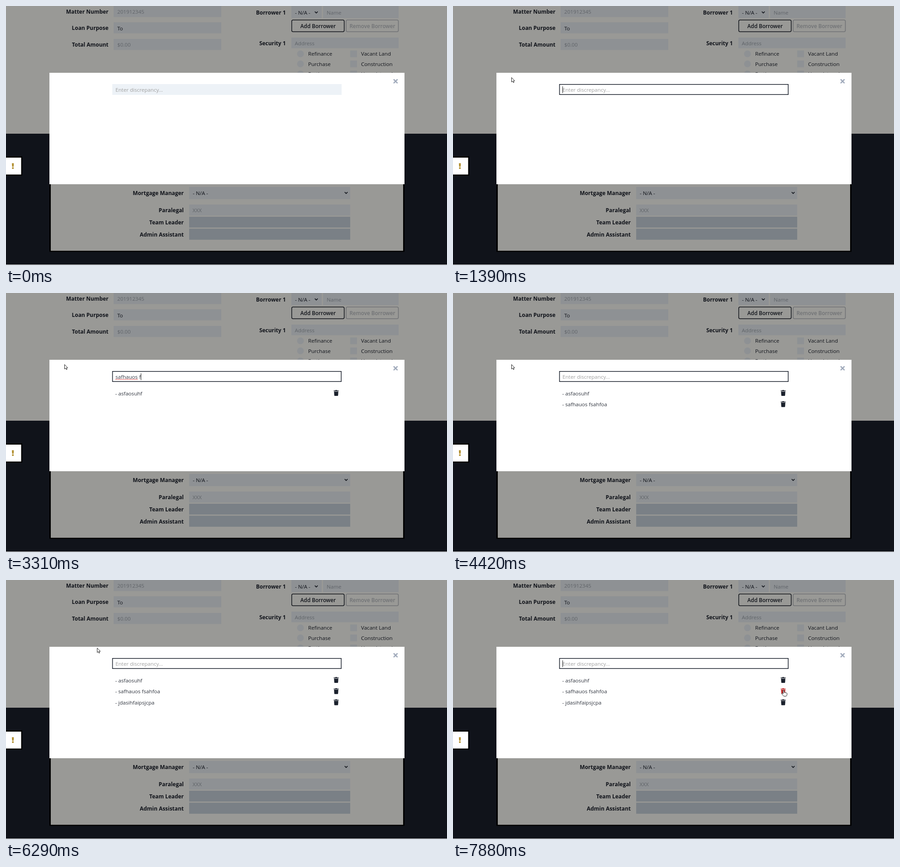
Recreate the animation shown at these times as an HTML page with a canvas. Size 975 by 574 pixels, loop 8 s.

```html
<!DOCTYPE html>
<html lang="en">
<head>
<meta charset="utf-8">
<title>Discrepancy form</title>
<style>
  html, body { margin: 0; width: 100%; height: 100%; overflow: hidden; }
  canvas { display: block; }
</style>
</head>
<body>
<canvas id="stage" width="975" height="574"></canvas>
<script>
const ctx = document.getElementById('stage').getContext('2d');
const LOOP = 8000, FOCUS = 1060, BLINK = 510;
const REGULAR = '11.6px "Open Sans", sans-serif';
const BOLD = 'bold 11.95px "Open Sans", sans-serif';
const SEMI = '600 11.7px "Open Sans", sans-serif';
const INK = '#1a202c', DIM_INK = '#10131a', PAGE = '#999996', DIM_FIELD = '#8e9194',
      DIM_FILLED = '#7a8086', DIM_HINT = '#606469', HINT = '#a0a0a0';

// keys: [time, number of characters typed]
const entries = [
  { text: 'asfaosuhf', submit: 2340,
    keys: [[1480, 1], [1600, 2], [1710, 3], [1860, 6], [1940, 8], [2120, 9]] },
  { text: 'safhauos fsahfoa', submit: 3910,
    keys: [[2880, 1], [3030, 3], [3120, 6], [3220, 9], [3310, 10], [3450, 11], [3510, 12], [3570, 13], [3620, 15], [3680, 16]] },
  { text: 'jdasihfaipsjcpa', submit: 5500,
    keys: [[4470, 2], [4640, 4], [4720, 5], [4800, 7], [4940, 8], [5010, 9], [5090, 11], [5160, 12], [5230, 14], [5310, 15]] },
];

// pointer stops: [time, x, y]
const stops = [
  [30, 855, 524], [400, 500, 174], [670, 500, 174], [900, 493, 184], [1090, 493, 184],
  [1240, 300, 158], [1330, 160, 152], [1390, 129, 158], [6130, 129, 158], [6400, 250, 145],
  [6650, 480, 178], [6900, 677, 232], [6950, 690, 231], [7130, 724, 231], [7370, 729, 228],
  [7520, 729, 228], [7880, 731, 244],
];

function rect(x, y, w, h, color) {
  ctx.fillStyle = color;
  ctx.fillRect(x, y, w, h);
}

function outline(x, y, w, h, radius, color) {
  ctx.beginPath();
  ctx.roundRect(x, y, w, h, radius);
  ctx.lineWidth = 1.5;
  ctx.strokeStyle = color;
  ctx.stroke();
}

function text(str, x, y, color = DIM_INK, font = REGULAR, align = 'left') {
  ctx.font = font;
  ctx.textAlign = align;
  ctx.fillStyle = color;
  ctx.fillText(str, x, y);
}

const label = (str, x, y) => text(str, x, y, DIM_INK, BOLD, 'right');

function chevron(x, y) {
  ctx.strokeStyle = DIM_INK;
  ctx.lineWidth = 1.6;
  ctx.stroke(new Path2D(`M${x - 3.2} ${y - 1.6}l3.2 3.2l3.2 -3.2`));
}

function drawPage() {
  rect(0, 0, 975, 283, PAGE);
  rect(0, 283, 975, 291, DIM_INK);
  rect(0, 573, 975, 1, '#d9dadb');

  [['Matter Number', '201912345', DIM_HINT], ['Loan Purpose', 'To', DIM_INK], ['Total Amount', '$0.00', DIM_HINT]]
    .forEach(([name, value, color], i) => {
      const y = i * 36.3;
      label(name, 226.5, y + 17);
      rect(238, Math.round(y), 238, 24.5, DIM_FIELD);
      text(value, 246, y + 17.3, color);
    });

  label('Borrower 1', 618.5, 18.5);
  rect(631, 0, 67, 27, DIM_FIELD);
  text('- N/A -', 639, 18.5);
  chevron(686, 14);
  rect(701, 0, 167, 27, DIM_FIELD);
  text('Name', 709, 18.5, DIM_HINT);
  outline(631.7, 31, 116, 26, 3, DIM_INK);
  text('Add Borrower', 690, 48.5, DIM_INK, SEMI, 'center');
  outline(752, 31, 115.5, 26, 3, '#707275');
  text('Remove Borrower', 810, 48.5, '#707275', SEMI, 'center');
  label('Security 1', 618.5, 86.5);
  rect(631, 70, 237, 23.5, DIM_FIELD);
  text('Address', 638.5, 86.5, DIM_HINT);

  [['Refinance', 'Vacant Land'], ['Purchase', 'Construction'], ['Further', 'Unregistered']]
    .forEach(([type, land], i) => {
      const y = 106 + i * 22.3;
      ctx.fillStyle = DIM_FIELD;
      ctx.beginPath();
      ctx.arc(651, y, 7.5, 0, 7);
      ctx.fill();
      rect(761, y - 7.5, 15, 15, DIM_FIELD);
      text(type, 668, y + 4.3);
      text(land, 785, y + 4.3);
    });

  rect(96, 390, 785, 155, '#000');
  rect(99, 390, 779, 152.5, PAGE);
  label('Mortgage Manager', 393, 419);
  rect(405, 401, 356, 27, DIM_FIELD);
  text('- N/A -', 413, 419);
  chevron(752, 414);
  label('Paralegal', 393, 457);
  rect(405, 440, 356, 24.5, DIM_FIELD);
  text('XXX', 412.5, 457.3, DIM_HINT);
  label('Team Leader', 393, 484);
  rect(405, 467, 356, 24, DIM_FILLED);
  label('Admin Assistant', 393, 511);
  rect(405, 493.5, 356, 24.5, DIM_FILLED);

  rect(0, 333, 36, 43, '#000');
  rect(0, 336, 33.5, 37.5, '#fff');
  ctx.fillStyle = '#b08d2c';
  ctx.fill(new Path2D('M13 348.5h4.4l-.6 7.8h-3.2zM15.2 357.2a2 2 0 1 1 -.01 0z'));
}

function trash(x, y, color) {
  ctx.fillStyle = color;
  ctx.fill(new Path2D(`M${x} ${y + 1}h3l.8 -1h3.4l.8 1h3v1.6h-11zM${x + .7} ${y + 3.4}h9.6l-.6 8.6q-.1 1 -1.1 1h-6.2q-1 0 -1.1 -1z`));
}

function drawModal(t, hovered) {
  rect(96, 148, 785, 247, '#fff');
  ctx.strokeStyle = '#a0aabb';
  ctx.lineWidth = 2.6;
  ctx.stroke(new Path2D('M857 162.5l8.6 8.6m0 -8.6l-8.6 8.6'));

  const focused = t >= FOCUS;
  rect(235, 173, 507, 24, focused ? '#fff' : '#edf2f7');
  if (focused) outline(235.5, 173.7, 505.6, 22.6, 0, INK);

  let typed = '', lastEdit = FOCUS;
  for (const { text: full, keys, submit } of entries) {
    for (const [time, count] of keys) {
      if (t >= time) { typed = full.slice(0, count); lastEdit = time; }
    }
    if (t >= submit) { typed = ''; lastEdit = submit; }
  }
  text(typed || 'Enter discrepancy...', 242, 190, typed ? '#3a3f4a' : HINT);

  const checked = typed.slice(0, Math.max(0, typed.indexOf(' ')));
  if (checked) {
    ctx.setLineDash([1.5, 1]);
    ctx.strokeStyle = '#e04040';
    ctx.lineWidth = 1.3;
    ctx.stroke(new Path2D(`M242 191.5h${ctx.measureText(checked).width}`));
    ctx.setLineDash([]);
  }
  if (focused && Math.floor((t - lastEdit) / BLINK) % 2 === 0) {
    rect(Math.round(242 + ctx.measureText(typed).width), 178, 1, 15, '#222');
  }

  entries.forEach(({ text: full, submit }, i) => {
    if (t < submit) return;
    text('- ' + full, 241.5, 226.5 + i * 24.7, '#30353f');
    trash(724.5, 215 + i * 24.7, i === hovered ? '#c53030' : INK);
  });
}

function pointerAt(t) {
  const next = stops.findIndex(stop => stop[0] > t);
  if (next === 0) return null;
  if (next < 0) return stops.at(-1).slice(1);
  const [t0, x0, y0] = stops[next - 1], [t1, x1, y1] = stops[next];
  const k = (t - t0) / (t1 - t0);
  return [x0 + (x1 - x0) * k, y0 + (y1 - y0) * k];
}

function hoveredRow(t, [x, y]) {
  if (t < 6000 || x < 724 || x > 736) return -1;
  return [0, 1, 2].findIndex(i => Math.abs(y - 221.5 - i * 24.7) < 7.5);
}

const ARROW = new Path2D('M.5 .5v10l2.3 -2l1.7 3.4l1.5 -.7l-1.5 -3.3h3z');
const BEAM = new Path2D('M-3 -4.5h2.2l.8 .7l.8 -.7h2.2M0 -4v8M-3 4.5h2.2l.8 -.7l.8 .7h2.2');
const HAND = new Path2D('M-1 1q0 -1.3 1.1 -1.3t1.1 1.3v4l5.2 1.2q1.4 .5 1.3 2l-.7 3.2q-.3 2.1 -1.6 2.1h-4.4q-1 0 -1.7 -1l-3 -4q-.7 -1.2 .3 -1.6q.9 -.3 1.6 .6l.8 .8z');

function drawPointer(t, [x, y], onTrash) {
  if (t >= 950 && t < 1090) {
    ctx.fillStyle = '#f6f35f';
    ctx.beginPath();
    ctx.arc(x - 1.5, y, 9.5, 0, 7);
    ctx.fill();
  }
  const inField = x > 235 && x < 742 && y > 173 && y < 197;
  ctx.save();
  ctx.translate(x, y);
  ctx.lineWidth = 1;
  ctx.strokeStyle = '#222';
  ctx.fillStyle = '#fff';
  const shape = onTrash ? HAND : inField ? BEAM : ARROW;
  if (shape !== BEAM) ctx.fill(shape);
  ctx.stroke(shape);
  ctx.restore();
}

function frame(now) {
  const t = now % LOOP;
  const pointer = pointerAt(t);
  const hovered = pointer ? hoveredRow(t, pointer) : -1;
  drawPage();
  drawModal(t, hovered);
  if (pointer) drawPointer(t, pointer, hovered >= 0);
  requestAnimationFrame(frame);
}
requestAnimationFrame(frame);
</script>
</body>
</html>
```
